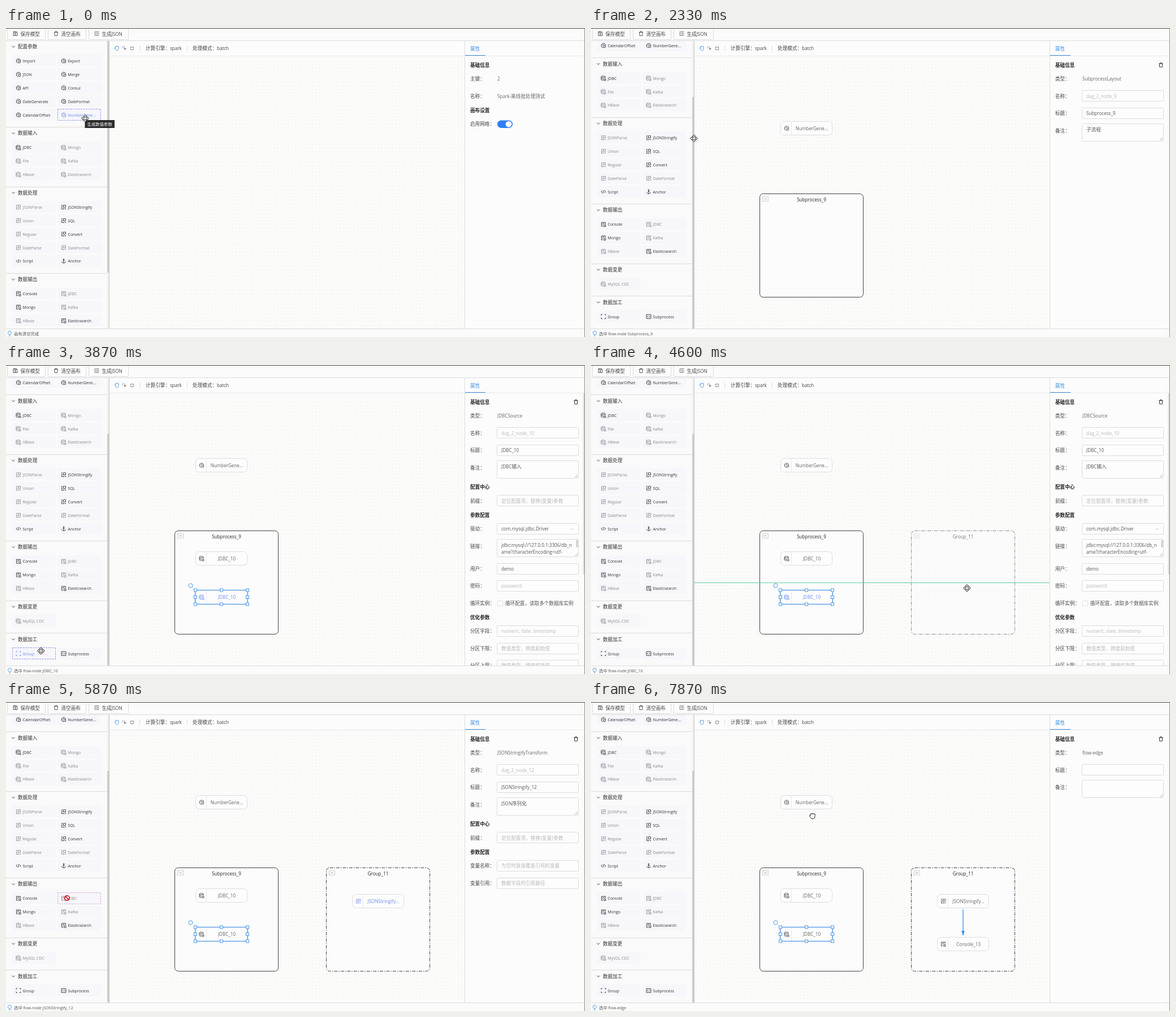
An HTML page that plays this animation: 1024x547 px, repeating every 8000 ms.

```html
<!DOCTYPE html>
<html lang="zh">
<head>
<meta charset="utf-8">
<style>
html, body { margin: 0; width: 100%; height: 100%; overflow: hidden; background: #fbfbfb; }
svg { display: block; width: 100vw; height: 100vh; font-family: "Open Sans", "Noto Sans", "Noto Sans CJK SC", sans-serif; }
text { white-space: pre; }
.c { font-family: "Noto Sans CJK SC", "Noto Sans CJK", sans-serif; font-size: 1.064em; }
</style>
</head>
<body>
<svg id="stage" viewBox="0 0 1024 547"></svg>
<script>
const LOOP = 8000, STEP = 1000 / 15;
const BLUE = '#3a8ee6', SEL = '#6a8df0', INK = '#444', DIM = '#8a8a8a', LINE = '#dcdcdc';
const stage = document.getElementById('stage');

const ICONS = {
  cfg: 'M0-4 3.5-2V0M0 4-3.5 2V-2L0-4M-1.6 0a1.6 1.6 0 0 1 3-.8M.2 1.8a1.8 1.8 0 1 0 3.6 0a1.8 1.8 0 1 0-3.6 0',
  db: 'M-4-2.5a3.5 1.3 0 1 0 7 0a3.5 1.3 0 1 0-7 0v5a3.5 1.3 0 0 0 3.5 1.3M3-2.5v3M-4 0a3.5 1.3 0 0 0 4 1.2M.8 1.6h3.2v2.6H.8z',
  trf: 'M-1.4 0h-2v3.5h3.8V1.8M-.4-3.5h3.9v3.7h-3.9zM-3.4-1.4v-2h1.6M3.4 1.8v1.6H2',
  code: 'M-2-2.2l-2 2.2 2 2.2M2-2.2l2 2.2-2 2.2M.8-3l-1.6 6',
  anchor: 'M0-2v5.5M-3.5.8c0 3.5 7 3.5 7 0M-1.5-.5h3M-1-3a1 1 0 1 0 2 0a1 1 0 1 0-2 0',
  out: 'M3.5-.5v-3h-7v7h3M-2-1.5h4M-2 .5h1.5M1 1h3v3h-3z',
  grp: 'M-4-1.8v-2h2M4-1.8v-2h-2M-4 1.8v2h2M4 1.8v2h-2',
  sub: 'M-4-3.5h8v7h-8zM-1-1.5l-1.3 1.5 1.3 1.5M1-1.5l1.3 1.5-1.3 1.5',
  save: 'M-3.5-3.5h5.5l1.5 1.5v5.5h-7zM-1.5-3.5v2.3h3v-2.3M-1 1.2a1 1 0 1 0 2 0a1 1 0 1 0-2 0',
  trash: 'M-3.7-2.4h7.4M-1.4-2.4v-1.4h2.8v1.4M-2.7-2.4l.3 6h4.8l.3-6',
  list: 'M-4-3h8M-4 3h8M-1 0h5M-4-1.3l1.6 1.3-1.6 1.3',
  hand: 'M-2.6 1.5l-1-2c0-1 1-.8 1.3 0v-2.5c0-.9 1.2-.9 1.2 0 0-1 1.4-1 1.4 0 0-.9 1.4-.9 1.4 0 0-.8 1.3-.8 1.3.2v2.8c0 2.4-1 3.8-2.6 3.8s-2.3-1-3-2.3z',
  pick: 'M-3-3h1.4M-.5-3h1.3M-3-1.5v1.3M0-1l3.3 1.5-1.5.6-.5 1.6z',
  fit: 'M-3.5-1.3h2.2v-2.2M3.5-1.3H1.3v-2.2M-3.5 1.3h2.2v2.2M3.5 1.3H1.3v2.2',
  down: 'M-2.6-1.3L0 1.3 2.6-1.3',
  bulb: 'M-1.3 2.2c0-1.3-1.8-1.8-1.8-3.5a3.1 3.1 0 0 1 6.2 0c0 1.7-1.8 2.2-1.8 3.5zM-1.2 4h2.4'
};

const SECTIONS = [
  ['配置参数', 'cfg', 'Import Export JSON Merge API Consul DateGenerate DateFormat CalendarOffset NumberGene...'],
  ['数据输入', 'db', 'JDBC -Mongo -File -Kafka -HBase -Elasticsearch'],
  ['数据处理', 'trf', '-JSONParse JSONStringify -Union SQL -Regular Convert -DateParse -DateFormat Script Anchor'],
  ['数据输出', 'out', 'Console -JDBC Mongo -Kafka -HBase Elasticsearch'],
  ['数据变更', 'db', '-MySQL_CDC'],
  ['数据加工', 'grp', 'Group Subprocess']
];
const OWN_ICON = { Script: 'code', Anchor: 'anchor', Subprocess: 'sub' };

// Pointer path: time, x, y
const PATH = [
  [0, 140, 160], [130, 140, 160], [530, 385, 182], [700, 122, 300], [880, 122, 330], [1000, 122, 510],
  [1400, 360, 407], [1650, 411, 387], [1700, 411, 387], [2130, 40, 89], [2600, 385, 347], [2800, 390, 350],
  [3000, 419, 369], [3070, 419, 369], [3500, 400, 417.5], [3800, 40, 510], [4430, 665, 395], [4800, 665, 395],
  [5100, 132, 194], [5530, 662, 358], [5870, 108, 347], [6000, 43, 347], [6470, 664, 432], [6600, 665, 390],
  [6800, 658, 366], [7130, 658, 418], [7300, 658, 390], [7800, 391, 202], [8000, 391, 202]
];

// Dragged from the list at t0, dropped at t1
const PARTS = [
  { t0: 1000, t1: 1700, x: 390, y: 385, box: 1, name: 'Subprocess_9' },
  { t0: 3800, t1: 4800, x: 658, y: 385, box: 1, dash: '6 2 1.5 2', name: 'Group_11' },
  { t0: 130, t1: 530, x: 381, y: 177.5, icon: 'cfg', name: 'NumberGene...', key: 'NumberGenerate_8' },
  { t0: 2130, t1: 2600, x: 381, y: 342.5, icon: 'db', name: 'JDBC_10' },
  { t0: 5100, t1: 5530, x: 658, y: 352.5, icon: 'trf', name: 'JSONStringify...', key: 'JSONStringify_12' },
  { t0: 6000, t1: 6470, x: 658, y: 428.5, icon: 'out', name: 'Console_13' }
];
const COPY = 2930, HALF = 91.5;

const head = (type, id, title, note) => [
  ['h', '基础信息'], ['t', '类型：', type], ['p', '名称：', 'dag_2_node_' + id],
  ['i', '标题：', title + '_' + id], ['a', '备注：', note]
];
const prefix = [['h', '配置中心'], ['p', '前缀：', '定位配置项，替换{变量}参数'], ['h', '参数配置']];
const VIEWS = [
  [0, '', [['h', '基础信息'], ['t', '主键：', '2'], ['t', '名称：', 'Spark-离线批处理测试'],
    ['h', '画布设置'], ['o', '启用网格：']]],
  [530, 'NumberGenerate_8', [...head('NumberGenerateConfig', 8, 'NumberGenerate', '生成数值参数'),
    ['h', '参数配置'], ['p', '外层变量：', 'like {outer: []}'], ['p', '内层变量：', 'like [{inner: 0}]'],
    ['n', '起始数值：', '0'], ['n', '步长数值：', '0'], ['n', '终止数值：', '0'], ['n', '除数因子：', '0']]],
  [1700, 'Subprocess_9', head('SubprocessLayout', 9, 'Subprocess', '子流程')],
  [2600, 'JDBC_10', [...head('JDBCSource', 10, 'JDBC', 'JDBC输入'), ...prefix,
    ['s', '驱动：', 'com.mysql.jdbc.Driver'],
    ['a', '链接：', 'jdbc:mysql://127.0.0.1:3306/db_n', 'ame?characterEncoding=utf-'],
    ['i', '用户：', 'demo'], ['p', '密码：', 'password'], ['c', '循环实例：', '循环配置，读取多个数据库实例'],
    ['h', '优化参数'], ['p', '分区字段：', 'numeric, date, timestamp'],
    ['p', '分区下限：', '数值类型，跨度起始值'], ['p', '分区上限：', '数值类型，跨度结束值']]],
  [4800, 'Group_11', head('GroupLayout', 11, 'Group', '分组')],
  [5530, 'JSONStringify_12', [...head('JSONStringifyTransform', 12, 'JSONStringify', 'JSON序列化'), ...prefix,
    ['p', '变量名称：', '为空时直接覆盖引用的变量'], ['p', '变量引用：', '数据字段的引用路径']]],
  [6470, 'Console_13', [...head('ConsoleSink', 13, 'Console', 'Console输出'), ...prefix,
    ['c', '打印配置：', '打印配置参数'], ['s', '输出模式：', '自适应打印输出模式']]],
  [7300, 'flow-edge', [['h', '基础信息'], ['t', '类型：', 'flow-edge'], ['i', '标题：', ''], ['a', '备注：', '']]]
];

const text = (x, y, s, fill = INK, size = 8.6, more = '') =>
  `<text x="${x}" y="${y + size * .35}" font-size="${size * .94}" fill="${fill}" ${more}>` +
  s.replace(/[\u2e80-\uffef]+/g, m => `<tspan class="c">${m}</tspan>`) + '</text>';
const rect = (x, y, w, h, fill = 'none', stroke = 'none', more = '') =>
  `<rect x="${x}" y="${y}" width="${w}" height="${h}" fill="${fill}" stroke="${stroke}" ${more}/>`;
const path = (d, stroke, more = '') => `<path d="${d}" fill="none" stroke="${stroke}" ${more}/>`;
const icon = (name, x, y, color = INK, width = .9) =>
  path(ICONS[name], color, `stroke-width="${width}" transform="translate(${x} ${y})"`);
const dot = (x, y, r) => `<circle cx="${x}" cy="${y}" r="${r}" fill="#fff" stroke="#8fa3ea" stroke-width=".9"/>`;
const ease = u => u * u * (3 - 2 * u);
const clamp = (v, a, b) => Math.min(b, Math.max(a, v));
const crisp = v => Math.floor(v) + .5;

function pointer(t) {
  const i = Math.max(1, PATH.findIndex(p => p[0] > t));
  const [ta, xa, ya] = PATH[i - 1], [tb, xb, yb] = PATH[i];
  const u = ease((t - ta) / (tb - ta));
  return { x: xa + (xb - xa) * u, y: ya + (yb - ya) * u };
}

function anchors({ x, y }, w, h) {
  return [[0, -h], [w, 0], [0, h], [-w, 0]].map(([a, b]) => dot(x + a, y + b, 2.6)).join('');
}

function node({ x, y, icon: i, name }, blue, square) {
  return rect(x - 45.5, y - 12, 91, 24, '#fdfdfd', '#d9dae2', `rx="${square ? 0 : 6}" stroke-width=".9"`) +
    path(`M${x - 26.5} ${y - 12}v24`, '#e2e2ea', 'stroke-width=".8"') +
    icon(i, x - 35, y, blue ? SEL : INK) + text(x + 9.5, y, name, blue ? SEL : '#666', 8.6, 'text-anchor="middle"');
}

function frameBox({ x, y, name, dash }, ghost) {
  return `<g opacity="${ghost ? .6 : 1}">` +
    rect(x - HALF, y - HALF, HALF * 2, HALF * 2, '#fcfcfc', '#444', `rx="6" stroke-dasharray="${dash || 'none'}"`) +
    rect(x - 86.5, y - 86.5, 10, 8, '#f8f8f8', '#cacaca', 'stroke-width=".8"') +
    path(`M${x - 83.5} ${y - 82.5}h4`, '#999', 'stroke-width=".8"') +
    text(x, y - 81.5, name, '#222', 8.6, 'text-anchor="middle"') + '</g>';
}

function selection(x, y) {
  let s = rect(x - 46.5, y - 12.5, 93, 25, 'none', BLUE);
  for (const a of [-46, 0, 46]) for (const b of [-12.5, 0, 12.5])
    if (a || b) s += rect(x + a - 2.5, y + b - 2.5, 5, 5, '#fff', BLUE, 'stroke-width=".9"');
  return s + `<circle cx="${x - 54.5}" cy="${y - 20.5}" r="3.6" fill="#fff" stroke="${BLUE}" stroke-width=".9"/>`;
}

function canvas(t, p, sel) {
  let s = rect(183, 50, 629, 482, '#fbfbfa') + rect(183, 50, 629, 482, 'url(#grid)');
  let edges = '', dragging = false, inBox = false;
  const placed = [];
  for (const part of PARTS) {
    if (t >= part.t1) {
      placed.push(part);
      s += part.box ? frameBox(part) : node(part, sel === (part.key || part.name) && !(part.icon === 'db' && t >= COPY));
      if (part.box && Math.max(Math.abs(p.x - part.x), Math.abs(p.y - part.y)) < HALF) inBox = true;
    } else if (t >= part.t0) {
      dragging = true;
      if (p.x < 183) continue;
      const end = pointer(part.t1);
      const at = { ...part, x: p.x + part.x - end.x, y: p.y + part.y - end.y };
      s += part.box ? frameBox(at, true) : `<g opacity=".75">${node(at, true)}</g>`;
      if (part.dash && Math.abs(at.y - part.y) < 1) edges += path(`M183 ${part.y + .5}H811`, '#62cfa6');
    }
  }
  const wiring = t >= 6800 && t < 7130;
  if (t >= 6800) {
    const c = t < 7300 ? '#777' : BLUE, y = wiring ? p.y : 413;
    edges += path(`M658 367V${Math.max(367, y)}`, c, 'stroke-width="1.3"');
    if (!wiring) edges += `<path d="M655.2 405h5.6l-2.8 8.5z" fill="${c}"/>`;
  }
  if (inBox && !dragging)
    for (const part of placed)
      if (!part.dash) s += part.box ? anchors(part, HALF, HALF) : anchors(part, 46, 12.3);
  if (t >= COPY) {
    const q = pointer(clamp(t, 3000, 3500)), x = q.x - 19, y = q.y - 6.5;
    s += node({ x, y, icon: 'db', name: 'JDBC_10' }, sel === 'JDBC_10', true) + selection(x, y);
  }
  s += edges + rect(183, 23, 629, 27, '#fcfcfc') + path('M183 49.5H811', '#e8e8e8') +
    icon('hand', 196, 36, BLUE) + icon('pick', 209, 36, '#666') + icon('fit', 223, 36, '#666') +
    path('M236.5 31v10M320.5 31v10', '#ddd') +
    text(247, 36, '计算引擎：spark') + text(330, 36, '处理模式：batch');
  return { svg: s, dragging, inBox };
}

function sidebar(t, p, dragging) {
  const scroll = 122.7 * ease(clamp((t - 700) / 180, 0, 1));
  let s = rect(0, 23, 183, 509, '#fafafa'), y = 33 - scroll;
  for (const [title, kind, names] of SECTIONS) {
    s += icon('down', 13, y, INK, 1) + text(21, y, title, '#333');
    const list = names.split(' ');
    list.forEach((raw, i) => {
      const off = raw[0] === '-', name = raw.replace('-', '').replace('_', ' ');
      const x = i % 2 * 80, cy = y + 25.2 + (i >> 1) * 23.9;
      const hover = (!dragging || p.x < 183) && Math.abs(p.x - x - 49) < 38 && Math.abs(p.y - cy) < 10;
      const c = hover && !off ? SEL : off ? DIM : '#333';
      s += rect(x + 11.5, crisp(cy - 10.5), 76, 20, '#f6f6fb', hover ? (off ? '#d9a5cf' : '#7f95ee') : 'none', 'stroke-width=".9" stroke-dasharray="3 1.5"') +
        icon(OWN_ICON[name] || kind, x + 22, cy, c) + text(x + 29.5, cy + .3, name, c, 7.4);
    });
    y += 57.7 + (Math.ceil(list.length / 2) - 1) * 23.9;
    if (kind !== 'grp') s += path(`M0 ${crisp(y - 10.8)}H179`, LINE);
  }
  return s + rect(179, 23, 3, 509, '#f0f0f0') + rect(179, 23 + scroll * .806, 3, 410, '#cdcdcd') +
    path('M182.5 23V532', '#c6c6c6');
}

function field(kind, y, value, second) {
  const box = w => rect(868.5, crisp(y - 9.7), w, 19, '#fdfdfd', LINE, 'rx="1"');
  switch (kind) {
    case 't': return text(869, y, value, '#666');
    case 'o': return rect(869, y - 6.7, 27, 13.6, '#2f80f5', 'none', 'rx="6.8"') +
      `<circle cx="889" cy="${y + .1}" r="5.4" fill="#fff"/>`;
    case 'c': return rect(869.5, crisp(y - 4.5), 9, 9, '#fff', LINE, 'rx="1"') + text(883, y, value, '#555');
    case 'n': return box(55) + text(876, y, value, '#777');
    case 'p': return box(144) + text(876, y, value, '#b8b8b8');
    case 's': return box(144) + text(876, y, value, '#555') + icon('down', 1001, y, '#bbb');
    case 'a': return rect(868.5, crisp(y - 12.5), 144, 31, '#fdfdfd', LINE, 'rx="1"') +
      text(876, y - 2, value, '#555') + path(`M1006 ${y + 17.5}l5-5M1009 ${y + 17.5}l2-2`, '#999', 'stroke-width=".8"') +
      (second ? text(876, y + 10.5, second, '#555') + rect(1008.5, y - 11, 3, 13, '#ccc') : '');
    default: return box(144) + text(876, y, value, '#555');
  }
}

function panel(sel, rows) {
  let s = rect(812, 23, 212, 509, '#fcfcfc') + path('M811.5 23V532', LINE) + path('M812 49.5H1024', '#e8e8e8') +
    text(821, 36.5, '属性', BLUE) + rect(812, 48, 36, 1, BLUE);
  let y = 65.5, last = '';
  for (const [kind, label, value, second] of rows) {
    if (last) y += (kind === 'h' ? 25.2 : last === 'h' ? 24.5 : 30.5) + (last === 'a' ? 9.4 : 0);
    s += kind === 'h' ? text(821, y, label, '#222', 8.6, 'font-weight="700"')
      : text(821, y, label) + field(kind, y, value, second);
    last = kind;
  }
  if (sel) s += icon('trash', 1008, 65.5, '#333', 1);
  if (sel === 'JDBC_10') s += rect(1020.5, 50, 2.5, 321, '#dedede');
  return s;
}

function bars(sel) {
  const status = !sel ? '画布清空完成' : '选中 ' + (sel === 'flow-edge' ? sel : 'flow-node ' + sel);
  let s = rect(0, 0, 1024, 22, '#fbfbfb') + path('M0 22.5H1024', LINE);
  [[2.5, 67, 'save', '保存模型'], [74.5, 67, 'trash', '清空画布'], [146.5, 70, 'list', '生成JSON']].forEach(
    ([x, w, i, label]) => s += rect(x, -1, w, 21.5, '#fcfcfc', LINE, 'rx="1"') + icon(i, x + 14, 10, INK) + text(x + 23, 10.5, label));
  return s + rect(0, 532, 1024, 15, '#fbfbfb') + path('M0 532.5H1024', LINE) +
    icon('bulb', 6.5, 541, BLUE) + text(14, 541.3, status, '#555', 7.4) +
    rect(0, 0, 1024, 1, '#4a4a4a') + rect(1023, 0, 1, 547, '#8c8c8c');
}

const MOVE = 'M0-6.5l2.6 2.8h-1.4v2.5h2.5v-1.4l2.8 2.6-2.8 2.6v-1.4h-2.5v2.5h1.4l-2.6 2.8-2.6-2.8h1.4v-2.5h-2.5v1.4l-2.8-2.6 2.8-2.6v1.4h2.5v-2.5h-1.4z';
const FIST = 'M-4 .5c-1.5-2 .3-3 1.3-1.5v-2.5c0-1.5 2-1.5 2 0 0-1.8 2-1.8 2 0 0-1.5 2-1.5 2 0 .2-1.2 1.8-1.2 1.8.3v3c0 3-1.5 5-4 5s-3.8-2-5.1-4.3z';

function cursor(t, p, move) {
  const at = `transform="translate(${p.x} ${p.y})"`;
  if (t > 5800 && t < 5935)
    return `<g ${at} fill="#fff" stroke="#d0222e" stroke-width="1.8"><circle r="4.2"/><path d="M-3-3l6 6"/></g>`;
  return `<path ${at} d="${move ? MOVE : FIST}" fill="#fff" stroke="#222" stroke-width="1" stroke-linejoin="round"/>`;
}

const DEFS = '<defs><pattern id="grid" x="183" y="50" width="6.14" height="6.14" patternUnits="userSpaceOnUse">' +
  '<circle cx="3" cy="3" r=".6" fill="#e6e6dc"/></pattern></defs>';

function render(t) {
  const p = pointer(t);
  const [, sel, rows] = VIEWS.filter(v => v[0] <= t).pop();
  const work = canvas(t, p, sel);
  const tip = t < 200 ? rect(139.5, 163, 52.5, 14, '#2b2b2b') + text(143.5, 170, '生成数值参数', '#fff', 7.4) : '';
  stage.innerHTML = DEFS + rect(0, 0, 1024, 547, '#fbfbfb') + work.svg + sidebar(t, p, work.dragging) +
    panel(sel, rows) + bars(sel) + tip + cursor(t, p, work.dragging || work.inBox || p.x < 183);
}

const start = performance.now();
let shown = -1;
function tick() {
  const step = Math.floor((performance.now() - start) % LOOP / STEP + .05);
  if (step !== shown) render(Math.min(LOOP - 1, (shown = step) * STEP + 4));
  requestAnimationFrame(tick);
}
tick();
</script>
</body>
</html>
```
